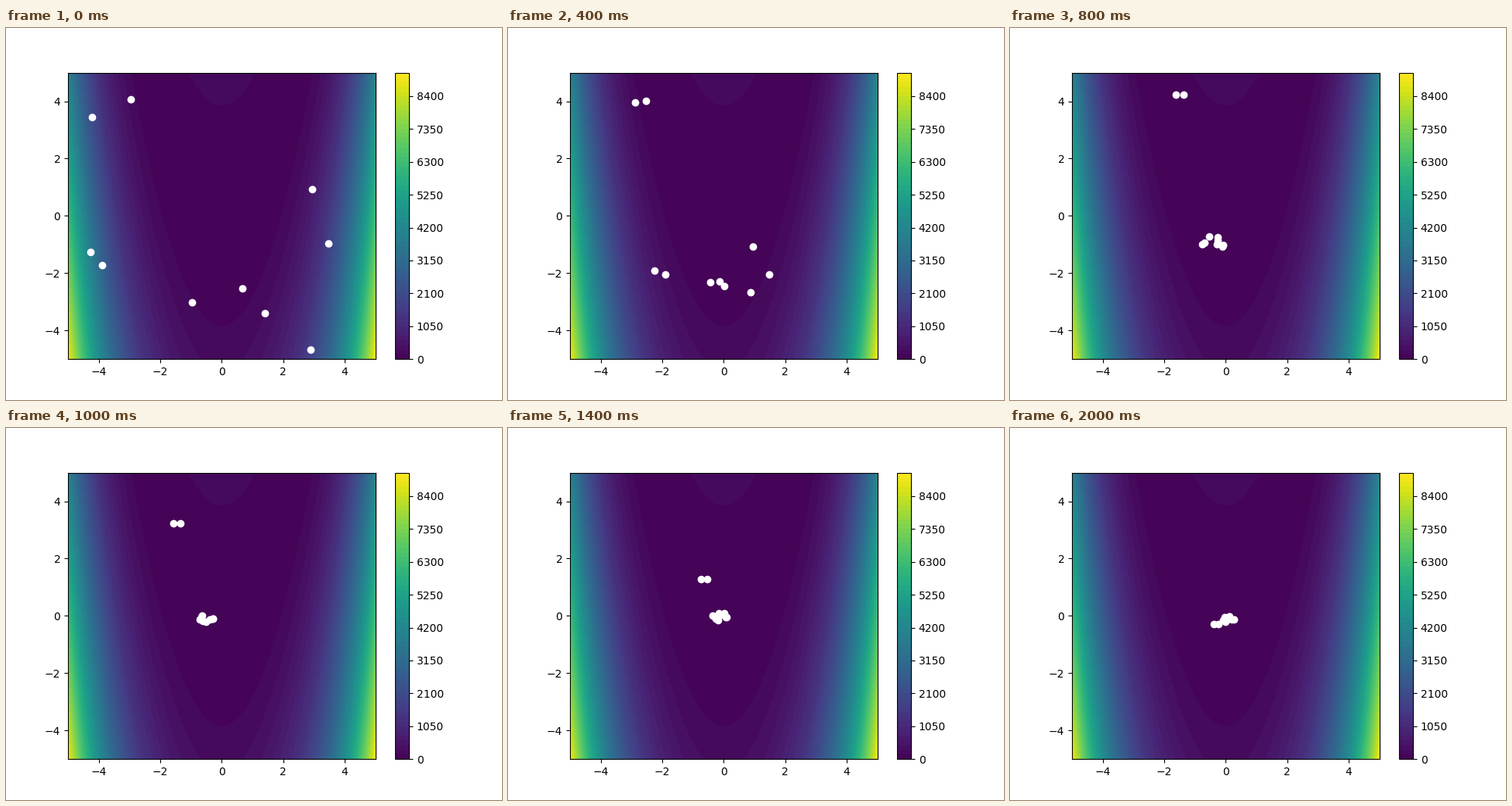
Write a matplotlib script that moves like this. It is 640 by 480 pixels and loops after 2100 ms.

```python
import numpy as np
import matplotlib.pyplot as plt
from matplotlib.animation import FuncAnimation

plt.rcParams["text.kerning_factor"] = 6

FRAMES, INTERVAL = 21, 100
GAIN, MAX_STEP = 0.5, 0.5

# Two particles get drawn to the upper valley, the rest to the lower one.
START = np.array([
    (-4.23, 3.46), (-2.95, 4.08),
    (-4.26, -1.25), (-3.90, -1.71), (-0.98, -3.01), (0.68, -2.52),
    (1.41, -3.41), (2.88, -4.66), (2.95, 0.94), (3.48, -0.95),
])
STRAYS = 2
REST = len(START) - STRAYS

# Points that lead each group, passed at these steps.
STEPS = [0, 2, 6, 9, 14, 20]
UPPER = [(-3.0, 3.4), (-3.4, 3.4), (-1.2, 5.2), (-1.6, 3.1), (-0.4, 0.8), (-0.3, -0.5)]
LOWER = [(0.1, -2.7), (0.0, -2.5), (-0.1, -1.6), (-0.7, 0.3), (0.0, -0.1), (0.1, -0.1)]


def rosenbrock(x, y, b=10):
    return x**2 + b * (y - x**2) ** 2


def lead(points, t):
    return [np.interp(t, STEPS, axis) for axis in zip(*points)]


def fly():
    """Every particle's position at every step."""
    rng = np.random.default_rng(4)
    radius = np.r_[[0.15] * STRAYS, rng.uniform(0.2, 0.5, REST)]
    phase = np.r_[np.pi, 0, np.arange(REST) * 2 * np.pi / REST]
    spin = np.r_[[0] * STRAYS, rng.uniform(0.2, 0.6, REST)]

    path = [START]
    for t in range(1, FRAMES):
        angle = phase + spin * t
        size = radius * (1 - t / 40)
        orbit = np.stack([size * np.cos(angle), 0.6 * size * np.sin(angle)], axis=1)
        goal = np.array([lead(UPPER, t)] * STRAYS + [lead(LOWER, t)] * REST) + orbit
        pos = path[-1]
        path.append(pos + np.clip(GAIN * (goal - pos), -MAX_STEP, MAX_STEP))
    return path


fig, ax = plt.subplots(figsize=(6.4, 4.8), dpi=100)
grid = np.linspace(-5, 5, 100)
X, Y = np.meshgrid(grid, grid)
surface = ax.contourf(X, Y, rosenbrock(X, Y), levels=np.arange(0, 9151, 150),
                      cmap="viridis")
fig.colorbar(surface, ax=ax, ticks=np.arange(0, 8401, 1050))
ax.set(xlim=(-5, 5), ylim=(-5, 5))

dots, = ax.plot([], [], "wo")
path = fly()


def update(i):
    dots.set_data(*path[i].T)
    return dots,


anim = FuncAnimation(fig, update, frames=FRAMES, interval=INTERVAL,
                     repeat=True, repeat_delay=0)
plt.show()
```
